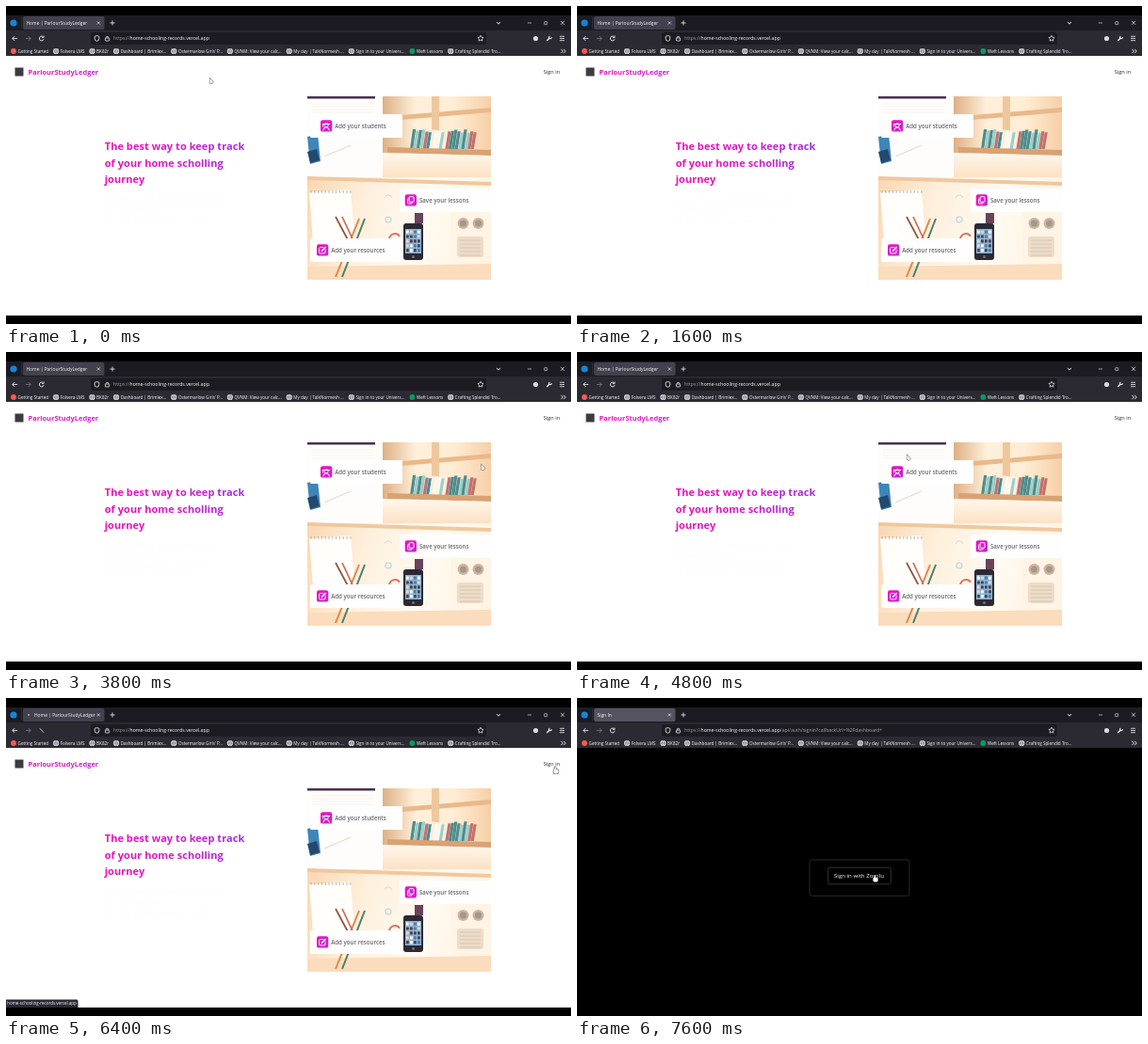
An HTML page with a canvas that plays this animation: 600 px wide and 338 px high, repeating every 8000 ms.

```html
<!DOCTYPE html>
<html lang="en">
<head>
<meta charset="utf-8">
<title>Browser walkthrough</title>
<style>
html, body { margin: 0; width: 100%; height: 100%; overflow: hidden; background: #000; }
canvas { display: block; width: 600px; height: 338px; }
</style>
</head>
<body>
<canvas id="stage" width="600" height="338"></canvas>
<script>
const ctx = document.getElementById('stage').getContext('2d');
const LOOP = 8000, STEP = 200;
const PAGE_TOP = 53, PAGE_END = 329;
const HOVER = 6000, LOADING = 6200, SIGN_IN = 6600, LOADED = 7200;
const LIGHT = '#f2f2f5', WHITE = '#fbfbfe';
const HOST = 'home-schooling-records.vercel.app';
const BRAND = 'ParlourStudyLedger';
const BOOKMARKS = [
  'Getting Started', 'Folvera LMS', 'BK82r', 'Dashboard | Brimlex...',
  "Ostermarlow Girls' P...", 'QVNM: View your calc...', 'My day | TalkNormesh ...',
  'Sign in to your Univers...', 'Weft Lessons', 'Crafting Splendid Tro...'
];
const LOGO_DOTS = { 'Getting Started': '#ff5a4f', 'Weft Lessons': '#0a9a62' };

// Each leg starts where the one before it ended.
const LEGS = [
  { start: 0, end: 400, x: 255, y: 106 },
  { start: 2800, end: 3000, x: 591, y: 95 },
  { start: 3000, end: 3400, x: 505, y: 120 },
  { start: 3800, end: 4400, x: 350.5, y: 109.5 },
  { start: 4800, end: 5800, x: 583, y: 73 },
  { start: 6400, end: 6600, x: 560.5, y: 80 },
  { start: 6600, end: 7600, x: 316, y: 188 }
];

function rect(x, y, w, h, fill, r = 0) {
  ctx.fillStyle = fill;
  ctx.beginPath();
  ctx.roundRect(x, y, w, h, r);
  ctx.fill();
}

function frame(x, y, w, h, color, r = 0, width = 0.7) {
  ctx.strokeStyle = color;
  ctx.lineWidth = width;
  ctx.beginPath();
  ctx.roundRect(x, y, w, h, r);
  ctx.stroke();
}

function disc(x, y, r, fill) {
  ctx.fillStyle = fill;
  ctx.beginPath();
  ctx.arc(x, y, r, 0, 7);
  ctx.fill();
}

function ring(x, y, r, color, width = 0.7, from = 0, to = Math.PI * 2) {
  ctx.strokeStyle = color;
  ctx.lineWidth = width;
  ctx.beginPath();
  ctx.arc(x, y, r, from, to);
  ctx.stroke();
}

function line(x0, y0, x1, y1, color = LIGHT, width = 0.8) {
  ctx.strokeStyle = color;
  ctx.lineWidth = width;
  ctx.beginPath();
  ctx.moveTo(x0, y0);
  ctx.lineTo(x1, y1);
  ctx.stroke();
}

// A band with slanted sides: left and right edges each run from y to y + h.
function band(x0, y0, x1, y1, h, fill, lean = 0) {
  ctx.fillStyle = fill;
  ctx.beginPath();
  ctx.moveTo(x0, y0);
  ctx.lineTo(x1, y1);
  ctx.lineTo(x1 + lean, y1 + h);
  ctx.lineTo(x0 + lean, y0 + h);
  ctx.fill();
}

function cross(x, y, r, color = LIGHT) {
  line(x - r, y - r, x + r, y + r, color, 0.7);
  line(x + r, y - r, x - r, y + r, color, 0.7);
}

function chevron(x, y, r, angle, color = LIGHT) {
  for (const side of [2.35, -2.35]) {
    line(x, y, x + r * Math.cos(angle + side), y + r * Math.sin(angle + side), color, 0.9);
  }
}

function blend(x0, y0, x1, y1, ...colors) {
  const g = ctx.createLinearGradient(x0, y0, x1, y1);
  colors.forEach((c, i) => g.addColorStop(i / (colors.length - 1), c));
  return g;
}

// Drawn large and scaled down so that small type keeps its true advances.
function text(str, x, y, size, color, weight = 400) {
  ctx.save();
  ctx.translate(x, y + size * 0.36);
  ctx.scale(0.1, 0.1);
  ctx.font = `${weight} ${size * 10}px "Open Sans", "Noto Sans", sans-serif`;
  ctx.fillStyle = color;
  ctx.fillText(str, 0, 0);
  const width = ctx.measureText(str).width / 10;
  ctx.restore();
  return x + width;
}

// The gradient is read in the enlarged space of the text helper.
const headingFill = width => blend(0, 0, width * 10, 0, '#f30db8', '#df18c9', '#9a30e2');

function seeded(seed) {
  return () => (seed = (seed * 16807) % 2147483647) / 2147483647;
}

function globe(x, y) {
  disc(x, y, 3.1, '#e9e9ec');
  ctx.strokeStyle = '#3a3943';
  ctx.lineWidth = 0.5;
  ctx.beginPath();
  ctx.ellipse(x, y, 1.3, 2.5, 0, 0, 7);
  ctx.stroke();
  line(x - 2.5, y, x + 2.5, y, '#3a3943', 0.5);
}

function star(x, y, r) {
  ctx.beginPath();
  for (let i = 0; i < 10; i++) {
    const d = i % 2 ? r * 0.48 : r, a = (i / 5 - 0.5) * Math.PI;
    ctx.lineTo(x + d * Math.cos(a), y + d * Math.sin(a));
  }
  ctx.closePath();
  ctx.strokeStyle = LIGHT;
  ctx.lineWidth = 0.7;
  ctx.stroke();
}

function drawTab(t) {
  const signIn = t >= SIGN_IN, loading = t >= LOADING && !signIn;
  rect(18, 11, 86.5, 14, signIn ? '#54535f' : '#42414d', 2);
  if (signIn && t < LOADED) {
    const p = (t - SIGN_IN) / (LOADED - SIGN_IN);
    ctx.globalAlpha = 1 - p;
    rect(18, 11, 86.5 * Math.min(1, 0.39 + 2 * p), 14, '#3a76b8', 2);
    ctx.globalAlpha = 1;
  }
  if (loading) disc(25 + Math.sin(t / 130), 18, 0.9, '#b9b9c4');
  text(signIn ? 'Sign In' : `Home | ${BRAND}`, loading ? 30 : 21.5, 18, 4.9, WHITE);
  cross(98.3, 18, 1.5);
}

function drawReload(t) {
  if (t >= SIGN_IN && t < LOADED) cross(38, 34.5, 2.3, '#85848e');
  else if (t >= SIGN_IN - STEP && t < SIGN_IN) line(35.8, 32.2, 40.2, 36.8);
  else {
    ring(37.8, 34.5, 2.4, LIGHT, 0.9, 0.3, 5.4);
    chevron(40, 33.6, 2, 0.8);
  }
}

function drawAddress(t) {
  rect(90, 28, 420, 13, '#1c1b22', 2);
  frame(94.2, 31.8, 4.6, 5.4, LIGHT, [1, 1, 2.3, 2.3], 0.8);
  frame(105.4, 34, 4.2, 3, LIGHT, 0.6, 0.8);
  ring(107.5, 33.8, 1.4, LIGHT, 0.8, Math.PI, 0);
  let x = text('https://', 114, 34.5, 5.15, '#9b9aa4');
  x = text(HOST, x, 34.5, 5.15, WHITE);
  if (t >= SIGN_IN) text('/api/auth/signin?callbackUrl=%2Fdashboard+', x, 34.5, 5.15, '#a5a4ad');
  star(504, 34.5, 3.3);
}

function drawBookmarks() {
  let x = 8;
  for (const label of BOOKMARKS) {
    const dot = LOGO_DOTS[label];
    if (dot) disc(x, 48, 2.9, dot);
    else globe(x, 48);
    x = text(label, x + 4.6, 48, 4.6, WHITE) + 8;
  }
  for (const tip of [591.5, 594.3]) chevron(tip, 48, 3, 0);
}

function drawChrome(t) {
  rect(0, 10, 600, 16, '#1c1b22');
  rect(0, 26, 600, PAGE_TOP - 26, '#2b2a33');
  disc(8, 18, 3.6, '#1685d8');
  line(16.5, 12, 16.5, 24, '#3c3b45', 0.6);
  drawTab(t);
  line(110.5, 18, 115.5, 18);
  line(113, 15.5, 113, 20.5);
  chevron(523, 19.2, 3, Math.PI / 2);
  line(553.8, 18, 558, 18, LIGHT, 0.6);
  frame(571.7, 16.7, 3, 3, LIGHT, 0.4, 0.6);
  cross(591, 17.8, 2);
  line(7, 34.5, 12.2, 34.5);
  chevron(6.8, 34.5, 3.4, Math.PI);
  line(20.8, 34.5, 26, 34.5, '#7b7a84');
  chevron(26.2, 34.5, 3.4, 0, '#7b7a84');
  drawReload(t);
  drawAddress(t);
  disc(562.5, 34.5, 2.6, '#d9d9de');
  line(574.3, 37, 577.3, 34, LIGHT, 1.3);
  ring(578, 33.2, 1.4, LIGHT, 1.1, 0, 4.2);
  for (let i = -1; i < 2; i++) line(588, 34.5 + i * 2.2, 593, 34.5 + i * 2.2);
  drawBookmarks();
}

function drawShelf() {
  rect(395, 96, 120, 90, blend(395, 0, 515, 0, '#d9a779', '#fff0da', '#ffedd5', '#f6cfa6'));
  band(420, 116, 515, 108, 5, '#e9b98b');
  rect(452, 96, 8, 38, '#efc79d');
  const random = seeded(23);
  const covers = ['#4f8c8d', '#fff8ef', '#c4716a', '#9ccfcb', '#fdeee0', '#3f8f9c'];
  for (let x = 432; x < 498; x += 3.4) {
    const top = 131 + random() * 4;
    band(x, top, x + 3.2, top, 152 - top, covers[Math.floor(random() * covers.length)], -3);
  }
  band(405, 150, 515, 153, 6, '#d9a274');
  band(400, 156, 515, 159, 30, blend(0, 156, 0, 188, '#fff7ec', '#fbdcbb'));
}

function drawPapers() {
  rect(320, 96, 80, 88, '#fffdfb');
  rect(320, 96, 72, 2.4, '#4a3150');
  for (let y = 104; y < 118; y += 3) line(325, y, 390, y, '#f0e6df', 0.5);
  band(320, 139, 331, 136, 29, '#3f86b8', 3);
  band(320, 155, 330, 152, 12, '#24486e', 3);
  line(338, 160, 366, 148, '#dccabb');
}

function drawDesk() {
  rect(320, 182, 195, 109, blend(320, 182, 515, 240, '#f9d7b2', '#fff0dd', '#fffaf1', '#fff3e2'));
  band(320, 181, 515, 187, 4, '#f0c89f');
  band(320, 277, 515, 274, 18, '#fbdcbc');
  band(322, 198, 366, 195, 52, '#fffefb', 4);
  for (let x = 324; x < 366; x += 3.8) line(x, 196, x, 199, '#9b8378', 0.6);
  for (let i = 0; i < 2; i++) {
    line(350 + i * 7, 224, 366 + i * 5, 254, ['#8c543f', '#d5674c'][i], 1.7);
    line(375 + i * 6, 226, 350 + i * 7, 288, ['#d98a4a', '#4c8068'][i], 2);
  }
  ring(406, 205, 4, '#c3e0e3', 1, 3.4, 6);
  ring(406, 227, 3, '#b3d9e0', 1.2);
  ring(413, 248, 6, '#dd6f64', 2, 2.8, 5.7);
}

function drawGadgets() {
  rect(434, 220, 9, 11, '#694359');
  rect(422, 231, 21, 39, '#2c2934', 3);
  rect(424, 237, 17, 26, '#8fb4d0');
  const random = seeded(7);
  for (let i = 0; i < 20; i++) {
    const tone = Math.floor(random() * 4);
    rect(425 + (i % 4) * 4, 238.5 + Math.floor(i / 4) * 4.9, 2.8, 3.2,
      ['#f4f9fb', '#477eac', '#4a4051', '#e6d4cc'][tone], 0.6);
  }
  disc(432.5, 266.6, 1.5, '#70707a');
  rect(473, 219, 41, 54, '#fff4e5', 3);
  for (let i = 0; i < 2; i++) {
    disc(485.5 + i * 16, 231, 6, '#c9b5a3');
    disc(485.5 + i * 16, 231, 3.6, '#a8968a');
  }
  rect(479, 245, 28, 22, '#ecdcc8', 3);
  for (let y = 249; y < 266; y += 4) line(482, y, 504, y, '#d9c5b0', 1);
}

function drawPhoto() {
  ctx.save();
  ctx.beginPath();
  ctx.rect(320, 96, 195, 195);
  ctx.clip();
  drawShelf();
  drawPapers();
  drawDesk();
  drawGadgets();
  ctx.restore();
}

function card(x, y, w, iconX, label, glyph) {
  rect(x, y, w, 25, '#fffefe', 1.5);
  const iconY = y + 6.3;
  rect(iconX, iconY, 12.3, 12.3, blend(iconX, iconY, iconX + 12, iconY + 12, '#f00fbc', '#c824d6'), 2.2);
  ctx.save();
  ctx.translate(iconX + 6.1, iconY + 6.1);
  glyph();
  ctx.restore();
  text(label, iconX + 15.2, iconY + 6.5, 6.15, '#66666b', 600);
}

function studentGlyph() {
  band(-4, -2.4, 4, -2.4, 1, '#fff');
  ring(0, -0.6, 2.1, '#fff', 0.9);
  ring(0, 5, 3.3, '#fff', 0.9, Math.PI, 0);
  line(-3.6, -2.3, -3.6, 1, '#fff', 0.7);
}

function copyGlyph() {
  frame(-3.3, -1.7, 4.6, 5.4, '#fff', 0.7, 0.9);
  rect(-1.7, -3.7, 4.9, 5.6, '#d81dcb', 0.7);
  frame(-1.7, -3.7, 4.9, 5.6, '#fff', 0.7, 0.9);
}

function editGlyph() {
  frame(-3.4, -2.8, 6.3, 6.3, '#fff', 0.8, 0.9);
  line(-1, 1.2, 3.5, -3.3, '#d81dcb', 3);
  line(-1, 1.2, 3.5, -3.3, '#fff', 1.5);
}

function drawHome() {
  rect(0, PAGE_TOP, 600, PAGE_END - PAGE_TOP, '#fff');
  rect(9.5, 65.5, 9, 9, '#3b3b40');
  text(BRAND, 23.5, 70, 7.5, headingFill(100), 700);
  text('Sign in', 570.8, 70, 5.6, '#202024');
  ['The best way to keep track', 'of your home scholling', 'journey'].forEach((row, i) =>
    text(row, 104.7, 149 + i * 17.6, 11.1, headingFill(150), 700));
  ['Keep every lesson, book and result in one', 'calm and tidy place', 'for all the students you teach at home'].forEach((row, i) =>
    text(row, 105, 205.5 + i * 11.5, 6.4, '#fcfcfc'));
  drawPhoto();
  card(323, 115, 98, 334, 'Add your students', studentGlyph);
  card(418, 194, 97, 423.7, 'Save your lessons', copyGlyph);
  card(323, 247, 98, 330, 'Add your resources', editGlyph);
}

function drawSignIn() {
  frame(247, 172, 106, 38.3, '#3b3b3e', 2.5);
  frame(266.7, 180.2, 66.6, 17.6, '#4a4a4e', 2);
  text('Sign in with Zorplu', 273, 189, 6.1, '#fff');
}

function arrowPath() {
  ctx.moveTo(0, 0);
  ctx.lineTo(0, 4.8);
  ctx.lineTo(1.9, 5.6);
  ctx.lineTo(3.5, 3.5);
  ctx.closePath();
}

function handPath() {
  ctx.roundRect(-0.6, 0, 1.4, 5, 0.7);
  ctx.roundRect(-1.6, 2.8, 5.2, 4.6, 1.4);
}

function drawPointer(t) {
  const i = LEGS.findLastIndex(leg => leg.start <= t);
  const to = LEGS[i], from = LEGS[i - 1] || { x: 216.5, y: 77 };
  if (i === 0 && t >= to.end) return;
  const u = Math.min(1, (t - to.start) / (to.end - to.start));
  const p = u * u * (3 - 2 * u);
  const x = from.x + (to.x - from.x) * p, y = from.y + (to.y - from.y) * p;
  const dark = t >= SIGN_IN;
  const onLink = dark ? x < 333 && y > 180 : x > 571 && y < 77;
  ctx.save();
  ctx.translate(x, y);
  ctx.beginPath();
  (onLink ? handPath : arrowPath)();
  ctx.strokeStyle = dark ? '#000' : onLink ? '#44444a' : '#77777d';
  ctx.lineWidth = 1.2;
  ctx.stroke();
  ctx.fillStyle = '#fff';
  ctx.fill();
  ctx.restore();
}

function draw(t) {
  rect(0, 0, 600, 338, '#000');
  if (t < SIGN_IN) drawHome();
  else drawSignIn();
  drawChrome(t);
  if (t >= HOVER && t < SIGN_IN) {
    rect(0, 320.5, 76.5, PAGE_END - 320.5, '#2b2a33', [0, 1.5, 0, 0]);
    text(HOST, 1.2, 324.8, 4.5, WHITE);
  }
  drawPointer(t);
}

const start = performance.now();
function tick() {
  const t = (performance.now() - start) % LOOP;
  draw(Math.floor(t / STEP) * STEP);
  requestAnimationFrame(tick);
}
tick();
</script>
</body>
</html>
```
